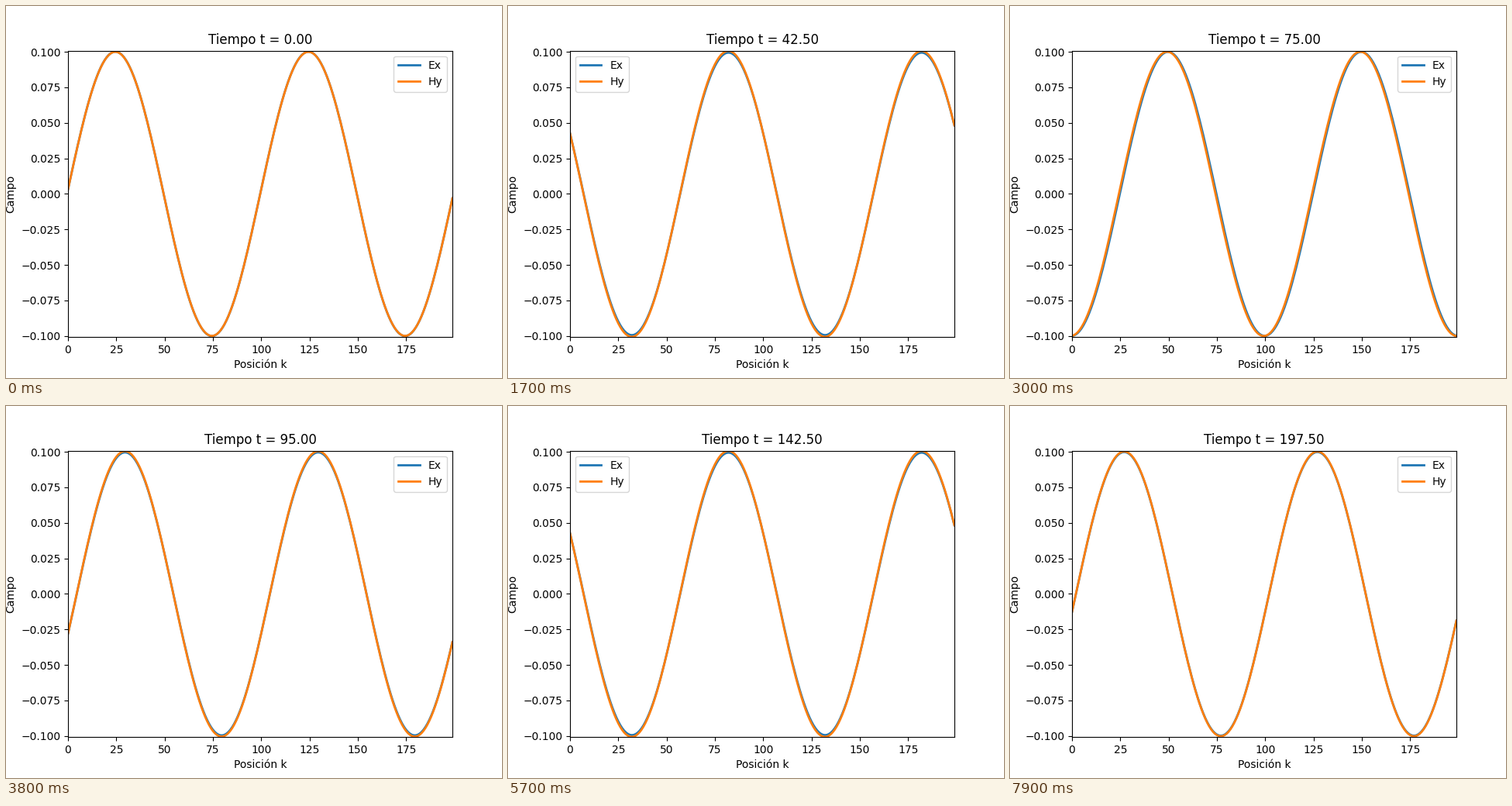
Recreate the animation shown at these times as a matplotlib script. Size 640x480 px, loop 8 s.

```python
import numpy as np
import matplotlib.pyplot as plt
from matplotlib.animation import FuncAnimation

N = 200          # grid cells
WAVELENGTH = 100
AMP = 0.1
DT = 0.5         # Courant number
STRIDE = 5       # time steps per frame
FRAMES = 80


def simulate(steps):
    """Leapfrog Ex/Hy on a periodic 1D grid, saved after every step."""
    ex = AMP * np.sin(2 * np.pi * np.arange(N) / WAVELENGTH)
    hy = ex.copy()
    history = np.empty((steps, 2, N))
    for n in range(steps):
        hy += DT * (np.roll(ex, -1) - ex)
        ex += DT * (hy - np.roll(hy, 1))
        history[n] = ex, hy
    return history


fields = simulate(FRAMES * STRIDE)
limit = np.abs(fields).max()

fig, ax = plt.subplots(figsize=(6.4, 4.8), dpi=100)
k = np.arange(N)
lines = [ax.plot(k, f, lw=2, label=name)[0]
         for f, name in zip(fields[0], ("Ex", "Hy"))]
ax.set_xlim(0, N - 1)
ax.set_ylim(-limit, limit)
ax.set_xlabel("Posición k")
ax.set_ylabel("Campo")
ax.legend(loc="best")
title = ax.set_title("Tiempo t = 0.00")


def update(frame):
    step = frame * STRIDE
    for line, field in zip(lines, fields[step]):
        line.set_ydata(field)
    title.set_text(f"Tiempo t = {step * DT:.2f}")
    return *lines, title


anim = FuncAnimation(fig, update, frames=FRAMES, interval=100,
                     repeat=True, repeat_delay=0, blit=False)
plt.show()
```
